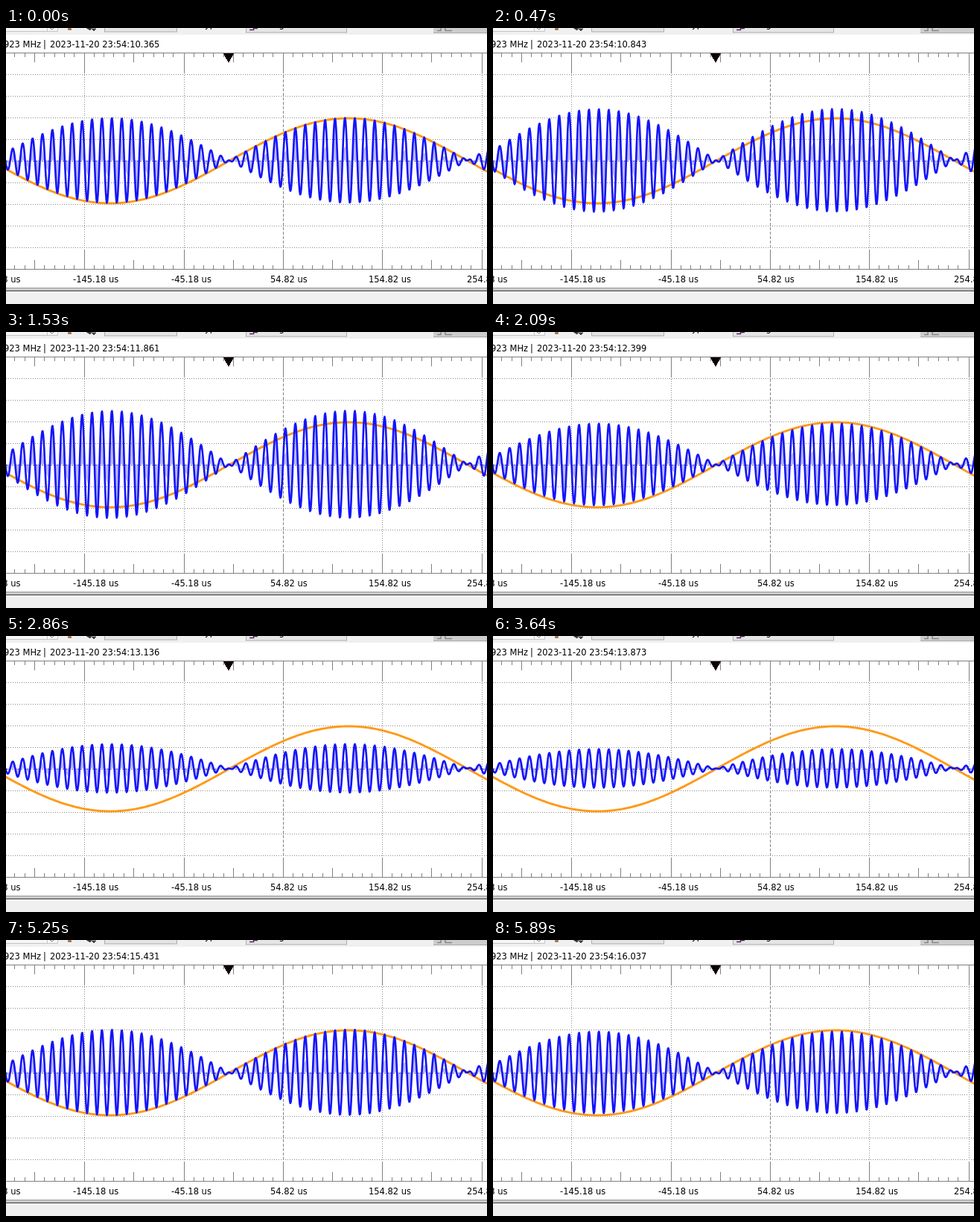
These frames come from a looping animation (646x370 px, 5.96 s). An HTML page:

```html
<!DOCTYPE html>
<html lang="en">
<head>
<meta charset="utf-8">
<title>Modulated carrier</title>
<style>
html, body { margin: 0; width: 100%; height: 100%; overflow: hidden; background: #fff; }
svg { display: block; width: 646px; height: 370px; }
text { font: 12.75px "DejaVu Sans Condensed", "Noto Sans", "Open Sans", sans-serif; fill: #000; white-space: pre; }
.crisp { shape-rendering: crispEdges; }
</style>
</head>
<body>
<svg viewBox="0 0 646 370" xmlns="http://www.w3.org/2000/svg">
  <rect width="646" height="370" fill="#fff"/>
  <g id="toolbar">
    <rect width="646" height="9" fill="#f0f0f0"/>
    <path d="M-1 -1V4.5H69.5V-1M55.5 0V4" fill="#f7f7f7" stroke="#c4c4c4"/>
    <path d="M59 0L61.5 2L64 0" fill="none" stroke="#777"/>
    <rect x="83" y="0" width="5" height="3" rx="1" fill="#a87848"/>
    <path d="M108 0L113 3L115 0M115 1h6l-3 3z" fill="#333" stroke="#555"/>
    <rect x="132.5" y="-3" width="97" height="8" fill="#e5e5e5" stroke="#adadad"/>
    <rect x="322.5" y="-3" width="135" height="9" fill="#e5e5e5" stroke="#adadad"/>
    <path d="M327 2.5H332.5V0M332 0.5H338" fill="none" stroke="#5b2468" stroke-width="1.5"/>
    <text x="262" y="-1">Type</text>
    <text x="339" y="-1">Rising</text>
    <rect x="574" y="0" width="72" height="6" fill="#cdcdcd"/>
    <path d="M574 6.5H646" stroke="#aaa"/>
    <path d="M579 3.5H584V0M590 0V3.5H599" fill="none" stroke="#888" stroke-width="1.5"/>
  </g>
  <g id="grid" class="crisp" fill="none"></g>
  <path id="tone" fill="none" stroke="#ff9a1a" stroke-width="2.9"/>
  <path id="band" fill="#0000ff" fill-opacity=".28"/>
  <path id="wave" fill="none" stroke="#1414fa" stroke-width="2.6" stroke-linejoin="round"/>
  <path class="crisp" d="M292 34H306L299 47Z" fill="#0a000a"/>
  <g id="labels">
    <text x="-3" y="26">923 MHz</text>
    <text x="50" y="26">|</text>
    <text id="clock" x="59" y="26"></text>
  </g>
  <g class="crisp">
    <rect y="348" width="646" height="22" fill="#f0f0f0"/>
    <rect y="348" width="646" height="1" fill="#a0a0a0"/>
    <rect y="349" width="646" height="3" fill="#c8c8c8"/>
    <rect y="352" width="646" height="1" fill="#444"/>
  </g>
</svg>
<script>
const LOOP = 5960, STEP = 70, LAST = 84;
const MID = 177.5, ZERO = 300, HALF = 320, CARRIER = 13.32, CREST = 455.2;
const SAMPLE = 5.33;
const START = Date.UTC(2023, 10, 20, 23, 54, 10, 365);

// [step, wave amplitude]
const LEVELS = [
  [0, 57], [4, 60], [9, 75], [12, 111], [15, 118], [18, 101], [22, 72], [27, 57], [30, 55],
  [36, 46], [42, 30], [47, 20], [52, 26], [58, 43], [65, 54], [72, 58], [77, 57], [84, 55]
];
// [step, milliseconds on the clock]
const CLOCK = [[0, 0], [12, 820], [22, 1496], [30, 2034], [52, 3508], [65, 4392], [84, 5672]];

const $ = id => document.getElementById(id);
const add = (parent, tag, attrs, content = '') => {
  const el = document.createElementNS('http://www.w3.org/2000/svg', tag);
  for (const key in attrs) el.setAttribute(key, attrs[key]);
  el.textContent = content;
  $(parent).append(el);
};

function lookup(table, n) {
  let i = 1;
  while (i < table.length - 1 && n > table[i][0]) i++;
  const [n0, a] = table[i - 1], [n1, b] = table[i];
  return a + (b - a) * (n - n0) / (n1 - n0);
}

function plot(fn, gap) {
  const points = [];
  for (let x = -6; x <= 654; x += gap) points.push(x.toFixed(1) + ' ' + fn(x).toFixed(2));
  return points.join('L');
}

const tone = x => Math.sin(Math.PI * (x - ZERO) / HALF);
const carrier = x => Math.cos(2 * Math.PI * (x - CREST) / CARRIER);

function buildGrid() {
  for (let i = 0; i < 9; i++) {
    add('grid', 'path', {
      d: `M0 ${62.5 + 29 * i}H646`, stroke: i === 4 ? '#707070' : '#888',
      'stroke-dasharray': i === 4 ? '2 2' : '1 2'
    });
  }
  for (let i = -3; i <= 2; i++) {
    const major = Math.floor(372.5 + i * 133.35) + 0.5;
    add('grid', 'path', {
      d: `M${major} 33V324`, stroke: '#888',
      'stroke-dasharray': i ? '1 2' : '4 2'
    });
    for (let k = 0; k < 10; k++) {
      const x = major + Math.floor(k * 13.3);
      const size = k === 0 ? 27 : k === 5 ? 13 : 6;
      add('grid', 'path', { d: `M${x} 33v${size}M${x} 324v${-size}`, stroke: '#808080' });
    }
  }
  add('grid', 'path', { d: 'M0 33.5H646M0 323.5H646', stroke: '#808080' });
}

function buildLabels() {
  const put = (x, content, anchor = 'start') =>
    add('labels', 'text', { x, y: 341, 'text-anchor': anchor }, content);
  put(19.5, '-245.18 us', 'end');
  put(90, '-145.18 us');
  put(222, '-45.18 us');
  put(355, '54.82 us');
  put(487, '154.82 us');
  put(619, '254.82 us');
}

function draw(index) {
  const level = lookup(LEVELS, index);
  const signal = x => MID - level * tone(x) * carrier(x);
  $('wave').setAttribute('d', 'M' + plot(signal, 0.7));
  // Coarse samples, filled down to the axis
  $('band').setAttribute('d', `M-6 ${MID}L${plot(signal, SAMPLE)}L654 ${MID}Z`);
  const stamp = new Date(START + Math.round(lookup(CLOCK, index))).toISOString();
  $('clock').textContent = stamp.slice(0, 23).replace('T', ' ');
}

const began = performance.now();
let shown = -1;
function tick() {
  const t = (performance.now() - began) % LOOP;
  const index = t < STEP ? 0 : Math.min(LAST, Math.floor((t + 20) / STEP));
  if (index !== shown) draw(shown = index);
  requestAnimationFrame(tick);
}

buildGrid();
buildLabels();
$('tone').setAttribute('d', 'M' + plot(x => 178 - 57 * tone(x), 3));
tick();
</script>
</body>
</html>
```
